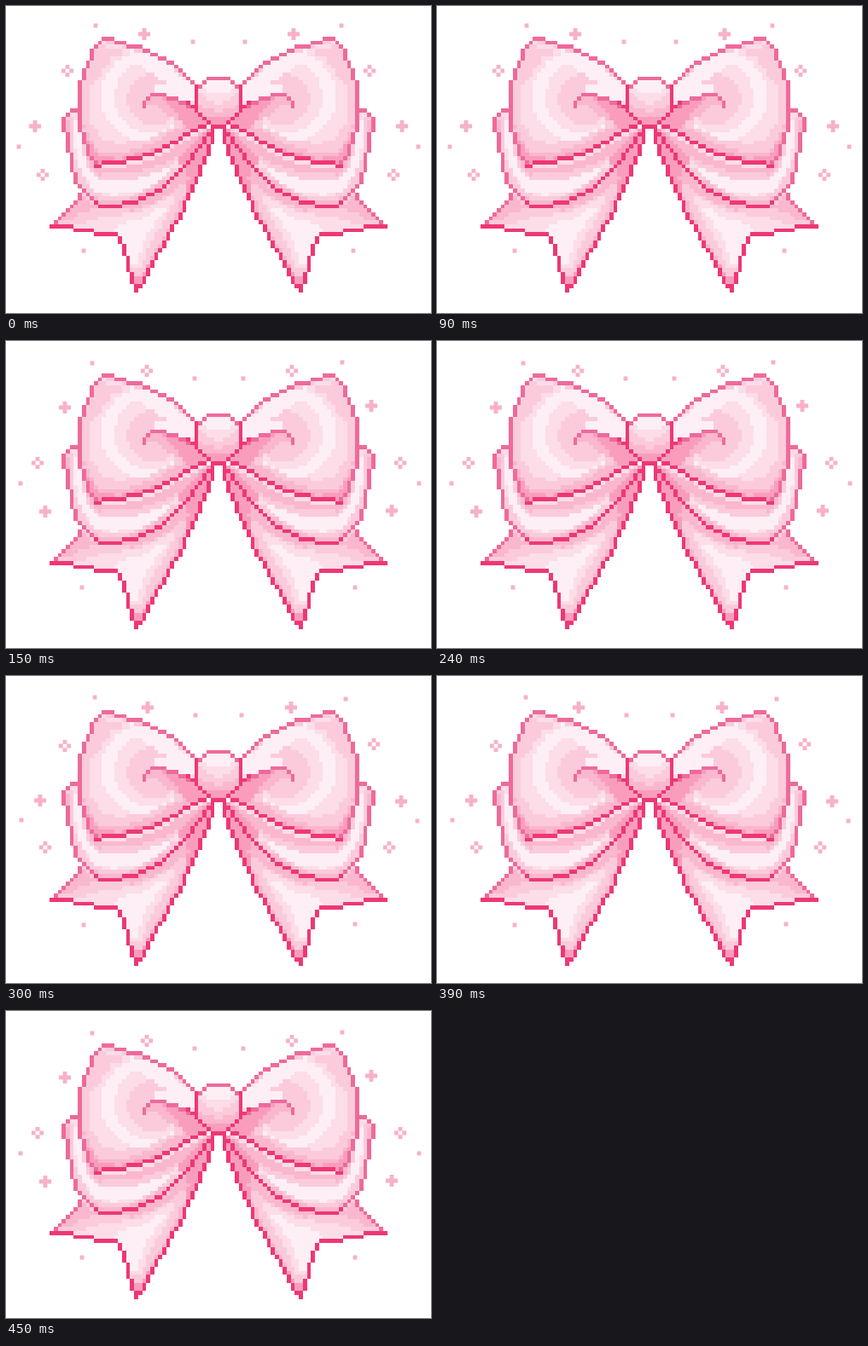
An HTML page with a canvas for the animation above (600 ms loop, 498 by 360 pixels).

```html
<!DOCTYPE html>
<html lang="en">
<head>
<meta charset="utf-8">
<title>Pixel bow</title>
<style>
  html, body { margin: 0; width: 100%; height: 100%; overflow: hidden; background: #fff; }
  canvas, svg { position: absolute; left: 0; top: 0; width: 498px; }
  canvas { height: 350px; animation: bob 600ms step-end infinite; }
  svg { height: 360px; overflow: hidden; }
  path { fill: #f7b1c8; visibility: hidden; animation: 600ms step-end infinite; }
  .high { animation-name: high; }
  .mid { animation-name: mid; }
  .low { animation-name: low; }
  @keyframes bob {
    0% { transform: translateY(0); }
    25%, 75% { transform: translateY(2px); }
    50% { transform: translateY(4px); }
  }
  @keyframes high { 0% { visibility: visible; } 25%, 100% { visibility: hidden; } }
  @keyframes mid { 0%, 50% { visibility: hidden; } 25%, 75% { visibility: visible; } }
  @keyframes low { 0%, 75% { visibility: hidden; } 50% { visibility: visible; } }
</style>
</head>
<body>
<canvas width="498" height="350"></canvas>
<svg viewBox="0 0 498 360"></svg>
<script>
const NS = 'http://www.w3.org/2000/svg';
const ctx = document.querySelector('canvas').getContext('2d');
const svg = document.querySelector('svg');
const MID = 249, TOP = 36, CW = 4.71, CH = 4.68, COLS = 42, ROWS = 64;
const DEEP = '#ef3774', SOFT = '#ee6a9a', WHITE = '#fdeff5', PALE = '#fcdde8',
      PINK = '#fbcbdc', ROSE = '#fab7ce', DARK = '#fa9dbd';

// One cell of the left half together with its mirror image.
function cell(c, r, color) {
  const near = Math.round(CW * c), far = Math.round(CW * (c + 1));
  const y = Math.round(TOP + CH * r), h = Math.round(TOP + CH * (r + 1)) - y;
  ctx.fillStyle = color;
  ctx.fillRect(MID - far, y, far - near, h);
  ctx.fillRect(MID + near, y, far - near, h);
}

function fill(shape, color, clip = shape) {
  const a = new Path2D(shape), b = new Path2D(clip);
  for (let r = 0; r < ROWS; r++) {
    for (let c = 0; c < COLS; c++) {
      const x = MID - CW * (c + .5), y = TOP + CH * (r + .5);
      if (ctx.isPointInPath(a, x, y) && ctx.isPointInPath(b, x, y)) cell(c, r, color);
    }
  }
}

// Walks along a path and leaves a one-cell line without doubled corners.
function line(d, color) {
  const path = document.createElementNS(NS, 'path');
  path.setAttribute('d', d);
  const cells = [], length = path.getTotalLength();
  for (let s = 0; s <= length; s += .5) {
    const p = path.getPointAtLength(s);
    const c = Math.floor((MID - p.x) / CW), r = Math.floor((p.y - TOP) / CH);
    const last = cells[cells.length - 1], prev = cells[cells.length - 2];
    if (last && last[0] === c && last[1] === r) continue;
    if (prev && Math.abs(prev[0] - c) === 1 && Math.abs(prev[1] - r) === 1) cells.pop();
    cells.push([c, r]);
  }
  cells.forEach(([c, r]) => cell(c, r, color));
}

function oval(x, y, rx, ry) {
  return `M${x - rx} ${y}a${rx} ${ry} 0 1 0 ${2 * rx} 0a${rx} ${ry} 0 1 0 ${-2 * rx} 0Z`;
}

function tail() {
  const edge = 'M242 146L241 160L237 172L229 192L219 215L209 237L199 257L185 282L171 305L160 327L158 333L152 333L148 318L143 300L138 282L133 267L102 266L98 262L77 262L73 258L53 258';
  const body = edge + 'L66 244L88 222L120 200L200 160Z';
  fill(body, PINK);
  fill('M72 262L100 250L128 246L160 240L192 222L198 224L186 252L168 278L157 310L146 306L132 268Z', PALE, body);
  fill('M118 267L140 254L160 250L184 234L186 240L172 258L160 278L153 302L146 302L132 268Z', WHITE, body);
  fill('M88 222L112 238L94 240L76 250L66 250Z', ROSE, body);
  fill('M110 233L150 233L188 214L212 186L242 145L240 166L216 202L188 223L150 240Z', ROSE, body);
  fill('M242 145L238 172L222 206L212 222L214 200L210 190Z', DARK, body);
  fill('M219 215L199 257L171 305L160 325L166 302L188 265L206 226Z', ROSE, body);
  fill('M170 300L156 335L147 314L157 318Z', DARK, body);
  line('M53 257L58 252L66 244L72 238L79 231L87 222', SOFT);
  line(edge, DEEP);
}

function underLoop() {
  const side = 'M86 122L78 123L73 126L68 130L68 149L73 152L73 170L78 175L78 195L83 199L83 210L88 214L96 222L107 230';
  const hem = 'M107 230L114 235L129 235L139 232L162 226L181 216L197 203L209 187L219 173L230 158L240 145';
  const body = side + hem.replace('M', 'L') + 'L200 130Z';
  fill(body, PALE);
  fill('M78 134L84 134L88 160L96 184L106 202L142 205L178 194L200 178L186 202L158 217L126 222L104 216L88 196L80 160Z', WHITE, body);
  fill('M84 122L93 124L98 160L105 192L140 190L178 180L212 158L240 140L218 166L190 190L150 203L110 204L94 188L88 164Z', PINK, body);
  fill('M90 150L98 178L105 191L140 188L170 181L202 163L240 142L228 158L196 181L150 195L107 198L94 180Z', ROSE, body);
  fill('M68 128L78 132L77 150L82 180L92 204L106 218L122 225L148 221L176 209L202 186L221 165L204 203L172 228L118 238L94 224L76 188Z', PINK, body);
  fill('M68 128L74 134L73 152L70 152ZM95 218L108 226L124 230L143 226L170 214L190 200L178 218L146 235L112 238Z', ROSE, body);
  fill('M240 143L219 161L200 180L206 190L222 172Z', DARK, body);
  line(side, SOFT);
  line(hem, DEEP);
}

function loop() {
  const rim = 'M224 93L217 86L208 78L198 70L187 64L174 58L160 51L145 47L131 44L124 39L114 38L109 43L104 52L98 66L92 82L87 96L87 149L92 153L92 162L97 166L97 177L102 181L104 187';
  const hem = 'M104 187L112 186L118 183L129 183L142 181L160 177L173 172L184 168L193 163L205 156L217 148L235 140';
  const body = rim + hem.replace('M', 'L') + 'L238 138L238 93Z';
  fill(body, PINK);
  fill('M112 42L146 50L180 64L224 96L226 116L190 104L164 106L154 122L166 140L140 162L114 158L100 136L98 104L105 72Z', PALE, body);
  fill(oval(160, 106, 48, 52), WHITE, body);
  fill(oval(169, 107, 42, 42), PALE, body);
  fill(oval(174, 109, 32, 30), PINK, body);
  fill('M145 51L180 62L220 94L220 104L200 96L176 84L158 69Z', WHITE, body);
  fill('M178 90L221 101L223 114L196 107L172 100Z', WHITE, body);
  fill('M112 46L134 52L138 58L123 62L113 76L106 90L98 84Z', PINK, body);
  fill('M87 128L98 138L108 158L128 164L160 160L192 144L216 124L236 140L200 162L160 180L104 188Z', PINK, body);
  fill('M88 132L98 152L108 172L140 171L172 161L200 145L224 130L236 140L192 165L144 183L103 188Z', ROSE, body);
  fill('M91 150L101 163L109 178L134 179L158 172L180 166L160 179L103 188Z', DARK, body);
  fill('M163 118L167 108L182 106L224 118L232 138L206 136L188 128L174 116Z', ROSE, body);
  fill('M184 108L212 115L226 122L236 140L216 146L206 136L198 122Z', DARK, body);
  line(rim, SOFT);
  line(hem, DEEP);
  line('M161 117L162 111L167 107L171 103L183 103L189 107L200 110L211 114L218 118', SOFT);
  line('M213 115L220 119L224 122', DEEP);
}

function knot() {
  const body = 'M249 84L236 84L230 90L223 95L223 124L228 131L234 139L249 141Z';
  fill(body, ROSE);
  fill('M249 86L235 87L225 97L226 113L236 121L249 124Z', PINK, body);
  fill('M249 86L235 88L226 98L229 106L238 112L249 114Z', PALE, body);
  fill('M249 88L238 88L231 96L234 101L249 101Z', WHITE, body);
  fill('M223 122L236 131L249 132L249 141L230 140Z', DARK, body);
  line('M248 85L237 85L232 89L228 93L223 96', SOFT);
  line('M223 96L223 124L228 128L228 132L233 136L237 140L248 140', DEEP);
}

// Each pose: dots, solid crosses and hollow crosses, as x y pairs.
const dot = (x, y) => `M${x - 2.4} ${y - 2.4}h4.8v4.8h-4.8z`;
const hollow = (x, y) => dot(x - 4.7, y) + dot(x + 4.7, y) + dot(x, y - 4.7) + dot(x, y + 4.7);
const cross = (x, y) => hollow(x, y) + dot(x, y);
const marks = [dot, cross, hollow];
const poses = {
  high: ['105 23 393 23 219 42 280 42 15 165 483 165 91 287 407 287',
         '162 33 337 33 34 141 464 141', '72 76 426 76 43 198 454 198'],
  mid: ['101 26 394 25 221 44 278 44 17 167 484 167 89 289 409 289',
        '69 78 428 76 46 200 452 199', '165 35 335 35 37 143 462 143'],
  low: ['104 25 398 27 222 46 276 46 18 169 482 170 91 292 409 291',
        '166 37 334 37 40 146 463 147', '69 82 431 80 46 201 449 201']
};

function sparkle(name) {
  let d = '';
  poses[name].forEach((list, i) => {
    const n = list.split(' ').map(Number);
    for (let j = 0; j < n.length; j += 2) d += marks[i](n[j], n[j + 1]);
  });
  const path = document.createElementNS(NS, 'path');
  path.setAttribute('d', d);
  path.setAttribute('class', name);
  svg.append(path);
}

tail();
underLoop();
loop();
knot();
Object.keys(poses).forEach(sparkle);
</script>
</body>
</html>
```
